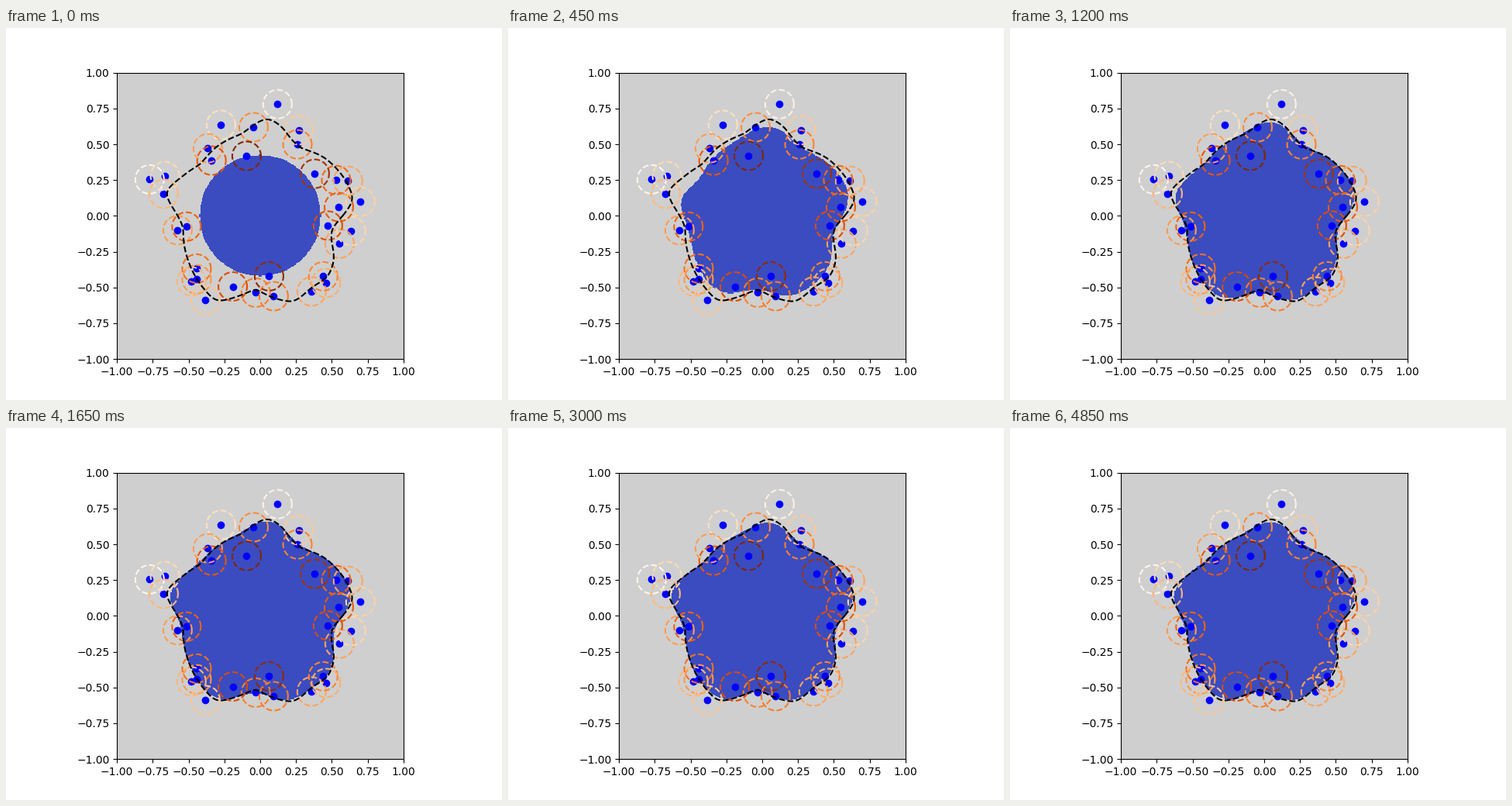
These frames come from a looping animation (640 by 480 pixels, 5000 ms). A matplotlib script:

```python
import numpy as np
import matplotlib.pyplot as plt
from matplotlib.animation import FuncAnimation
from matplotlib.colors import ListedColormap

FRAMES, INTERVAL = 100, 50
LAST_STEP = 97
GRID = 320
TAU = 2 * np.pi
ANGLES = np.linspace(0, TAU, 720, endpoint=False)

SAMPLES = np.array([
    (-.772, .255), (-.665, .278), (-.674, .154), (-.577, -.100),
    (-.515, -.075), (-.444, -.368), (-.444, -.443), (-.480, -.458),
    (-.382, -.588), (-.192, -.493), (-.031, -.536), (.094, -.561),
    (.062, -.422), (.359, -.528), (.440, -.422), (.459, -.469),
    (.554, -.194), (.635, -.106), (.473, -.068), (.549, .061),
    (.700, .099), (.613, .245), (.530, .250), (.381, .294),
    (.268, .598), (.260, .499), (.121, .780), (-.046, .619),
    (-.095, .419), (-.274, .635), (-.366, .472), (-.340, .386),
])

# Bends of the dashed outline: degrees, radius
BENDS = np.array([
    (10, .662), (22, .647), (42, .606), (59, .548), (68, .573), (77, .645),
    (86, .688), (102, .585), (123, .570), (139, .548), (154, .612),
    (166, .686), (179, .577), (188, .540), (212, .592), (230, .637),
    (243, .672), (253, .592), (266, .505), (280, .583), (291, .645),
    (306, .612), (318, .636), (329, .602), (341, .522), (349, .505),
    (356, .540),
])


def polar(r, angle):
    return r * np.cos(angle), r * np.sin(angle)


def blur(r, cutoff):
    """Damp the angular detail of a closed outline above the cutoff."""
    spectrum = np.fft.rfft(r)
    k = np.arange(spectrum.size)
    return np.fft.irfft(spectrum * np.exp(-(k / cutoff) ** 2 / 2), r.size)


bends_r = np.interp(ANGLES, np.radians(BENDS[:, 0]), BENDS[:, 1], period=TAU)
curve = blur(bends_r, 20)
dent = np.exp(-((ANGLES - np.radians(155)) / 0.25) ** 2)


def jitter(frame):
    rng = np.random.default_rng(frame)
    k = np.arange(2, 10)[:, None]
    amp = rng.normal(0, 0.0012, k.shape)
    return (amp * np.cos(k * ANGLES + rng.uniform(0, TAU, k.shape))).sum(0)


def learned(t):
    """Outline that gains detail as it settles on the curve."""
    shape = blur(curve, 9 - 6 * np.exp(-t / 6))
    swing = 0.04 * np.exp(-t / 10) * np.sin(TAU * t / 7)
    lean = 1 + 0.5 * np.cos(ANGLES - 3.3)
    return shape - 0.03 * np.exp(-t / 7) - 0.09 * dent * np.exp(-t / 12) + swing * lean


def outline(frame):
    frame = min(frame, LAST_STEP)
    if frame <= 3:
        return 0.422 + (learned(0) - 0.422) * frame / 3
    return learned(frame - 3) + jitter(frame)


axis = (np.arange(GRID) + 0.5) * 2 / GRID - 1
gx, gy = np.meshgrid(axis, axis)
g_radius, g_angle = np.hypot(gx, gy), np.arctan2(gy, gx)


def region(frame):
    edge = np.interp(g_angle, ANGLES, outline(frame), period=TAU)
    return (g_radius > edge).astype(float)


def shades(points):
    """Darker well inside the curve, paler well outside it."""
    x, y = points.T
    r = np.hypot(x, y)
    cx, cy = polar(curve, ANGLES)
    gap = np.hypot(x[:, None] - cx, y[:, None] - cy).min(axis=1)
    side = np.sign(r - np.interp(np.arctan2(y, x), ANGLES, curve, period=TAU))
    return np.clip(0.5 - 2 * side * gap - 1.2 * (r - 0.6), 0, 1)


fig, ax = plt.subplots(figsize=(6.4, 4.8), dpi=100)
image = ax.imshow(region(0), cmap=ListedColormap(["#3b4cc0", "#cfcfcf"]),
                  vmin=0, vmax=1, extent=(-1, 1, -1, 1), origin="lower",
                  interpolation="nearest")

ax.plot(*SAMPLES.T, "o", color="blue", ms=6, zorder=1)
turn = np.linspace(0, TAU, 100)
ring_x, ring_y = polar(0.1, turn)
for (x, y), shade in zip(SAMPLES, shades(SAMPLES)):
    ax.plot(x + ring_x, y + ring_y, "--", lw=1.5, color=plt.cm.Oranges(shade))

ax.plot(*polar(np.append(curve, curve[0]), np.append(ANGLES, TAU)), "k--", lw=1.5)

ticks = np.linspace(-1, 1, 9)
ax.set(xlim=(-1, 1), ylim=(-1, 1), xticks=ticks, yticks=ticks)


def update(frame):
    image.set_data(region(frame))
    return [image]


anim = FuncAnimation(fig, update, frames=FRAMES, interval=INTERVAL,
                     repeat=True, repeat_delay=0)
plt.show()
```
